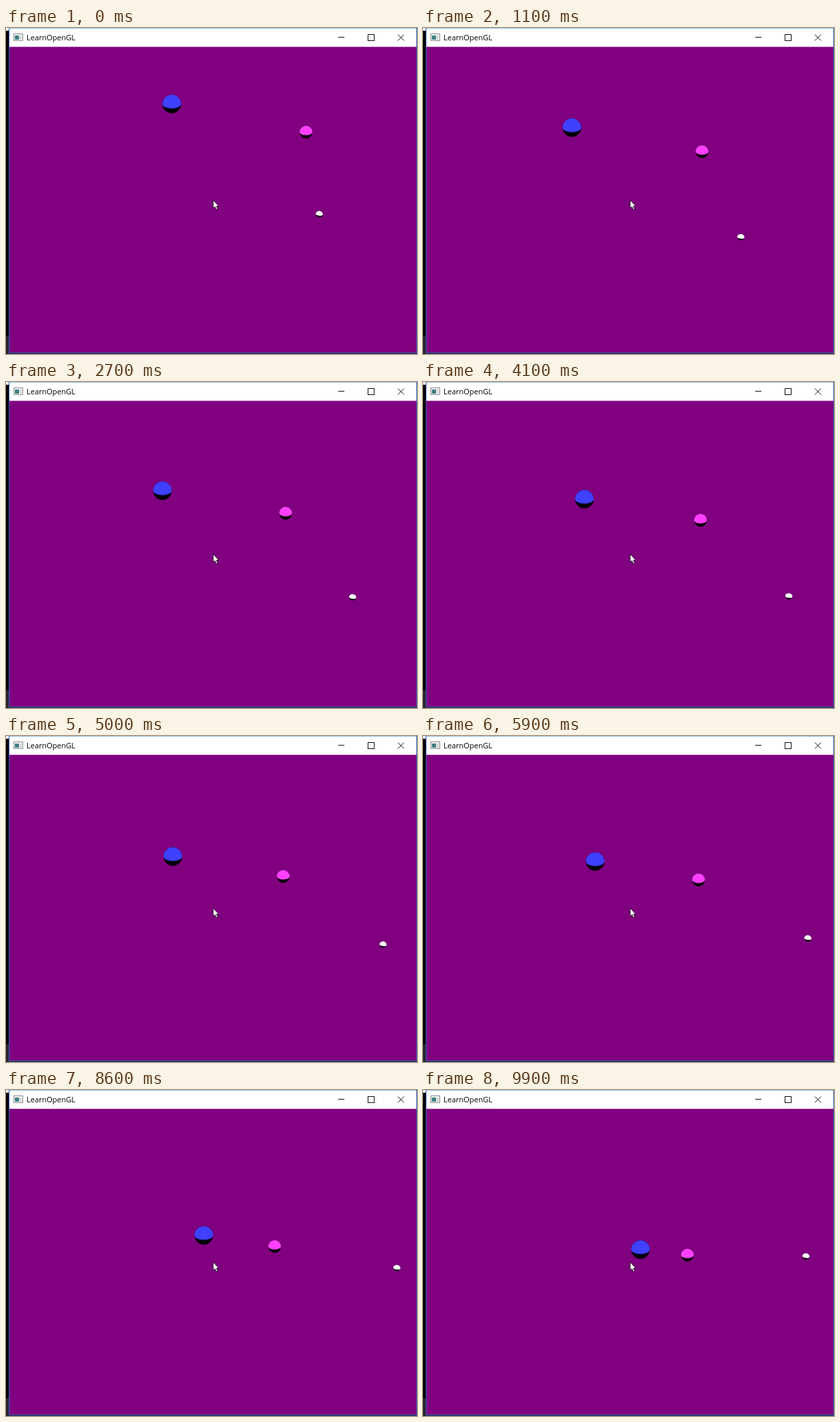
An HTML page for the animation above (10 s loop, 600x476 px).

```html
<!DOCTYPE html>
<html lang="en">
<head>
<meta charset="utf-8">
<title>LearnOpenGL</title>
<style>
  html, body { margin: 0; width: 100%; height: 100%; overflow: hidden; background: #800080; }
  svg { display: block; position: absolute; left: 0; top: 0; }
  text { font: 11px "Open Sans", "Noto Sans", sans-serif; fill: #000; }
</style>
</head>
<body>
<svg width="600" height="476" viewBox="0 0 600 476">
  <!-- desktop edge and window frame -->
  <rect width="600" height="476" fill="#800080"/>
  <rect width="4" height="4" fill="#f4f4f4"/>
  <rect y="4" width="4" height="446" fill="#000"/>
  <rect y="450" width="4" height="26" fill="#26262e"/>
  <rect y="475" width="600" height="1" fill="#26262e"/>
  <rect x="4" width="596" height="27.5" fill="#fff"/>
  <path d="M4 .5H600" stroke="#8fc3ea"/>
  <path d="M4.5 0V474.5H599.5V0" fill="none" stroke="#2c62b8"/>

  <!-- title bar -->
  <rect x="11.5" y="8.5" width="13" height="10" fill="#f3f3f3" stroke="#8c8c8c"/>
  <rect x="13" y="11" width="6" height="6" fill="#3f7f80"/>
  <rect x="20" y="11" width="3" height="6" fill="#d4d8dc"/>
  <text x="30" y="18">LearnOpenGL</text>
  <g fill="none" stroke="#111">
    <path d="M485 13.5H494"/>
    <rect x="528.5" y="9.5" width="9" height="9"/>
    <path d="M572 9.5L581 18.5M581 9.5L572 18.5"/>
  </g>

  <g id="balls"></g>

  <path d="M302.5 251.5V263.2L305 260.8L307 265.2L309 264.3L307.1 260.1H310.5Z"
        fill="#fff" stroke="#111" stroke-width=".8"/>
</svg>
<script>
const LOOP = 10, STEP = .1;
const TURN = 1.1;   // seconds the camera needs to turn into view
const END = 9.9;

// Each ball drifts along one cubic Bezier path
const balls = [
  { color: '#4040ff', shade: '#20208a', rx: 13.5, ry: 13.4, tilt: 0,
    from: [242, 111], path: [[217.3, 145.5], [240, 173], [240, 183.5], [317.5, 233]] },
  { color: '#ff40ff', shade: '#8a208a', rx: 9.3, ry: 9.3, tilt: 0,
    from: [438, 152], path: [[407.3, 180.5], [411.3, 204], [397.8, 212.5], [386, 241]] },
  { color: '#ffffff', shade: '#777777', rx: 5.2, ry: 4.5, tilt: 8,
    from: [457.3, 271.8], path: [[464, 305.4], [547.5, 337.4], [595, 282], [559, 243]] }
];

const bezier = ([a, b, c, d], s) => {
  const r = 1 - s;
  return r * r * r * a + 3 * s * r * r * b + 3 * s * s * r * c + s * s * s * d;
};
const smooth = u => u * u * (3 - 2 * u);

function place({ from, path }, t) {
  const s = (t - TURN) / (END - TURN);
  const turned = smooth(Math.min(t / TURN, 1));
  const sway = Math.sin(5 * Math.PI * s);
  return [1.2, -1.5].map((amp, axis) => {
    const drift = bezier(path.map(p => p[axis]), s) + amp * sway;
    return from[axis] + (drift - from[axis]) * turned;
  });
}

function add(parent, name, attrs) {
  const node = document.createElementNS('http://www.w3.org/2000/svg', name);
  for (const key in attrs) node.setAttribute(key, attrs[key]);
  parent.append(node);
  return node;
}

// Upper half disc with a lower edge bulging down by b
const dome = b => `M-1 0A1 1 0 0 1 1 0A1 ${b} 0 0 1 -1 0Z`;

for (const ball of balls) {
  ball.node = add(document.getElementById('balls'), 'g');
  add(ball.node, 'circle', { r: 1, fill: '#000' });
  add(ball.node, 'path', { d: dome(.54), fill: ball.shade });
  add(ball.node, 'path', { d: dome(.44), fill: ball.color });
}

function draw(seconds) {
  const t = Math.floor(seconds % LOOP / STEP + 1e-6) * STEP;
  for (const ball of balls) {
    const [x, y] = place(ball, t);
    ball.node.setAttribute('transform',
      `translate(${x} ${y}) rotate(${ball.tilt}) scale(${ball.rx} ${ball.ry})`);
  }
}

const start = performance.now();
function tick() {
  draw((performance.now() - start) / 1000);
  requestAnimationFrame(tick);
}
tick();
</script>
</body>
</html>
```
